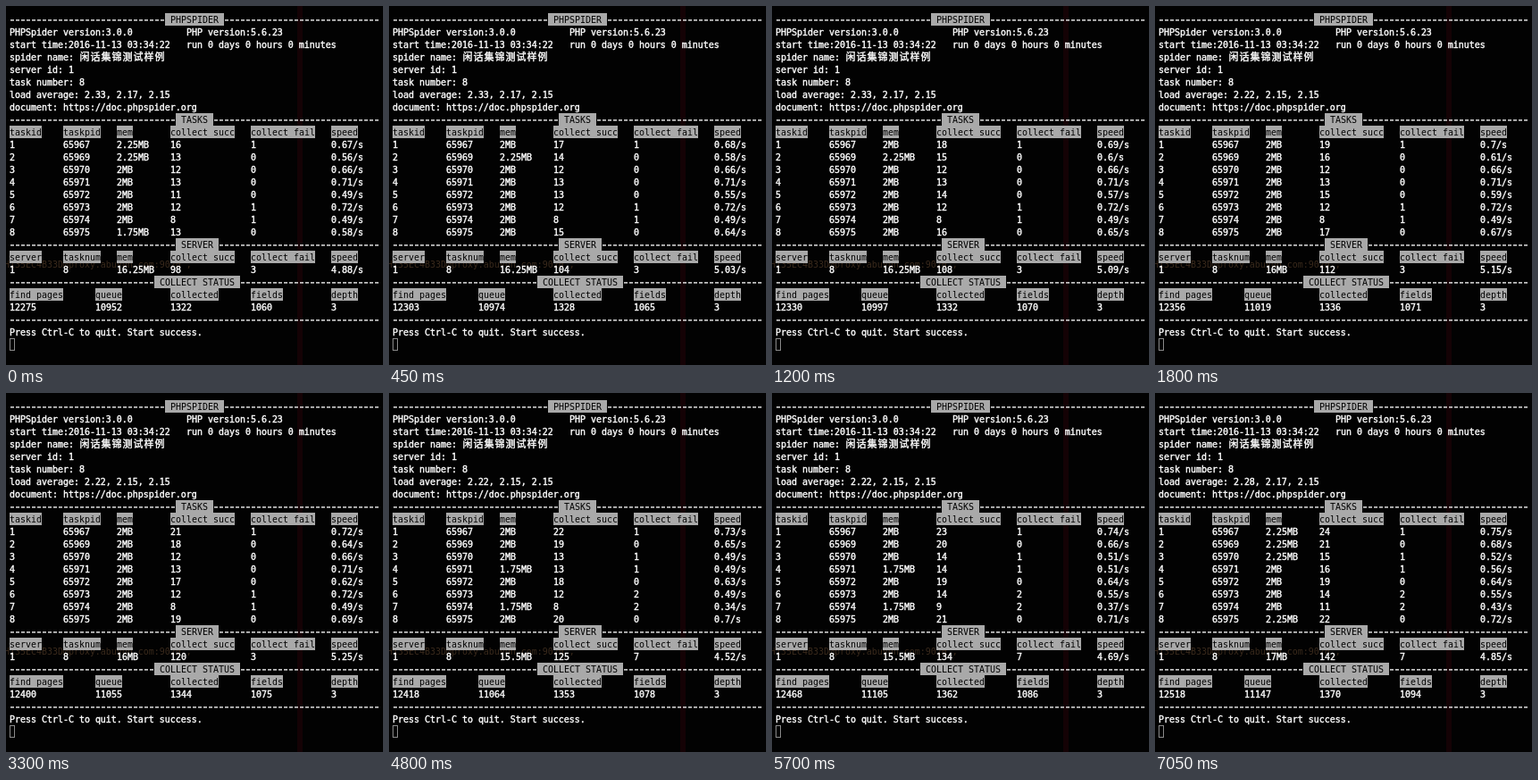
These frames come from a looping animation (422 by 402 pixels, 8000 ms). An HTML page with a canvas:

```html
<!DOCTYPE html>
<html lang="en">
<head>
<meta charset="utf-8">
<title>Crawler status</title>
<style>
  html, body { margin: 0; width: 100%; height: 100%; overflow: hidden; background: #020202; }
  canvas { display: block; }
</style>
</head>
<body>
<canvas id="term" width="422" height="402"></canvas>
<script>
const ctx = document.getElementById('term').getContext('2d');
const CELL = 6, LINE = 14, LEFT = 4, TOP = 8, COLS = 69, LOOP = 8000;
const MONO = '9.967px "DejaVu Sans Mono", monospace';
const WIDE = '11px "Noto Sans CJK SC", "Noto Sans CJK", sans-serif';
const TASK_COLS = [0, 10, 20, 30, 45, 60];
const STAT_COLS = [0, 16, 30, 45, 60];
const REFRESH_AT = [0, 450, 1200, 1800, 2400, 3300, 4800, 5700, 7050];
const WAKE = 6; // refresh at which blocked tasks time out and resume

// age: seconds run at the first refresh; idle: frozen running time of a blocked task
const workers = [
  { first: 16, age: 24, fail: 1 },
  { first: 13, age: 23.1 },
  { first: 12, gain: 3, from: 5, age: 20.6, idle: 18.2 },
  { first: 13, gain: 3, from: 6.7, age: 20.6, idle: 18.3 },
  { first: 11, to: 7, age: 22.5 },
  { first: 12, gain: 2, from: 6, to: 7, age: 18.5, idle: 16.7, fail: 1 },
  { first: 8, gain: 3, from: 6.7, age: 17.5, idle: 16.3, fail: 1 },
  { first: 13, gain: 9, age: 22.5 },
];

const clamp = v => Math.min(1, Math.max(0, v));
const tidy = v => +v.toFixed(2);

// Straight lines through points two refreshes apart.
function along(points, n) {
  const i = Math.min(n >> 1, points.length - 2);
  return Math.round(points[i] + (points[i + 1] - points[i]) * (n / 2 - i));
}

function memory(id, n) {
  const high = n > 7 ? id % 8 < 4 : id < 3 && n < 2 * id - 1;
  const low = n < 1 ? id === 8 : n >= WAKE && n < 8 && (id === 4 || id === 7);
  return 2 + (high - low) / 4;
}

function taskAt({ first, gain = 8, from = 0, to = 8, age, idle = 0, fail = 0 }, id, n) {
  const blocked = idle && n < WAKE;
  const succ = first + Math.ceil(gain * clamp((n - from) / (to - from)));
  const elapsed = blocked ? idle : age + Math.min(n, to);
  return {
    mem: memory(id, n),
    succ,
    fail: fail + (idle && !blocked ? 1 : 0),
    speed: tidy(succ / elapsed),
  };
}

const xOf = col => LEFT + col * CELL;
const yOf = row => TOP + row * LINE;

function glyphs(text, x, y, font) {
  ctx.font = font;
  ctx.fillStyle = ctx.strokeStyle = '#fff';
  ctx.lineWidth = .4;
  ctx.fillText(text, x, y);
  ctx.strokeText(text, x, y);
}

const write = (text, col, row) => glyphs(text, xOf(col), yOf(row) + 11, MONO);

function writeWide(text, col, row) {
  [...text].forEach((ch, i) => glyphs(ch, xOf(col + 2 * i) + .5, yOf(row) + 11, WIDE));
}

function invert(text, col, row) {
  ctx.fillStyle = '#a9a9a9';
  ctx.fillRect(xOf(col), yOf(row), text.length * CELL, LINE);
  ctx.font = MONO;
  ctx.fillStyle = '#000';
  ctx.fillText(text, xOf(col), yOf(row) + 11);
}

function rule(row, title) {
  ctx.fillStyle = '#eee';
  for (let col = 0; col < COLS; col++) ctx.fillRect(xOf(col) + 1, yOf(row) + 7.2, 4, 1.4);
  if (title) invert(` ${title} `, Math.ceil((COLS - title.length - 2) / 2), row);
}

const heads = (names, cols, row) => names.split(',').forEach((name, i) => invert(name, cols[i], row));
const cells = (values, cols, row) => values.forEach((value, i) => write(value, cols[i], row));

function backdrop() {
  ctx.fillStyle = '#020202';
  ctx.fillRect(0, 0, 422, 402);
  ctx.fillStyle = '#140205';
  ctx.fillRect(326, 0, 6, 402);
  ctx.font = MONO;
  ctx.fillStyle = '#3a2a1c';
  ctx.fillText("H135EC4B33D@proxy.abuyun.com:9020',", -2, 293);
}

function draw(time) {
  const n = REFRESH_AT.findLastIndex(at => at <= time);
  const tasks = workers.map((worker, i) => taskAt(worker, i + 1, n));
  const load = n < 3 ? '2.33, 2.17, 2.15' : n < 8 ? '2.22, 2.15, 2.15' : '2.28, 2.17, 2.15';
  const sum = key => tidy(tasks.reduce((total, task) => total + task[key], 0));
  const metrics = ({ mem, succ, fail, speed }) => [mem + 'MB', succ, fail, speed + '/s'];
  const total = { mem: sum('mem'), succ: sum('succ'), fail: sum('fail'), speed: sum('speed') };
  const done = total.succ + total.fail + 1221;
  const pages = along([12275, 12330, 12381, 12418, 12518], n);
  const fields = along([1060, 1070, 1072, 1078, 1094], n);

  backdrop();
  rule(0, 'PHPSPIDER');
  write('PHPSpider version:3.0.0', 0, 1);
  write('PHP version:5.6.23', 33, 1);
  write('start time:2016-11-13 03:34:22', 0, 2);
  write('run 0 days 0 hours 0 minutes', 33, 2);
  write('spider name:', 0, 3);
  writeWide('闲话集锦测试样例', 13, 3);
  write('server id: 1', 0, 4);
  write('task number: 8', 0, 5);
  write('load average: ' + load, 0, 6);
  write('document: https://doc.phpspider.org', 0, 7);

  rule(8, 'TASKS');
  heads('taskid,taskpid,mem,collect succ,collect fail,speed', TASK_COLS, 9);
  tasks.forEach((task, i) => {
    cells([i + 1, 65967 + i + (i > 0), ...metrics(task)], TASK_COLS, 10 + i);
  });

  rule(18, 'SERVER');
  heads('server,tasknum,mem,collect succ,collect fail,speed', TASK_COLS, 19);
  cells([1, 8, ...metrics(total)], TASK_COLS, 20);

  rule(21, 'COLLECT STATUS');
  heads('find pages,queue,collected,fields,depth', STAT_COLS, 22);
  cells([pages, pages - done - 1, done, fields, 3], STAT_COLS, 23);

  rule(24);
  write('Press Ctrl-C to quit. Start success.', 0, 25);
  ctx.strokeStyle = '#8a8a8a';
  ctx.lineWidth = 1;
  ctx.strokeRect(xOf(0) + .5, yOf(26) + .5, 5, 13);
}

const start = performance.now();
function tick() {
  draw((performance.now() - start) % LOOP);
  requestAnimationFrame(tick);
}
tick();
</script>
</body>
</html>
```
